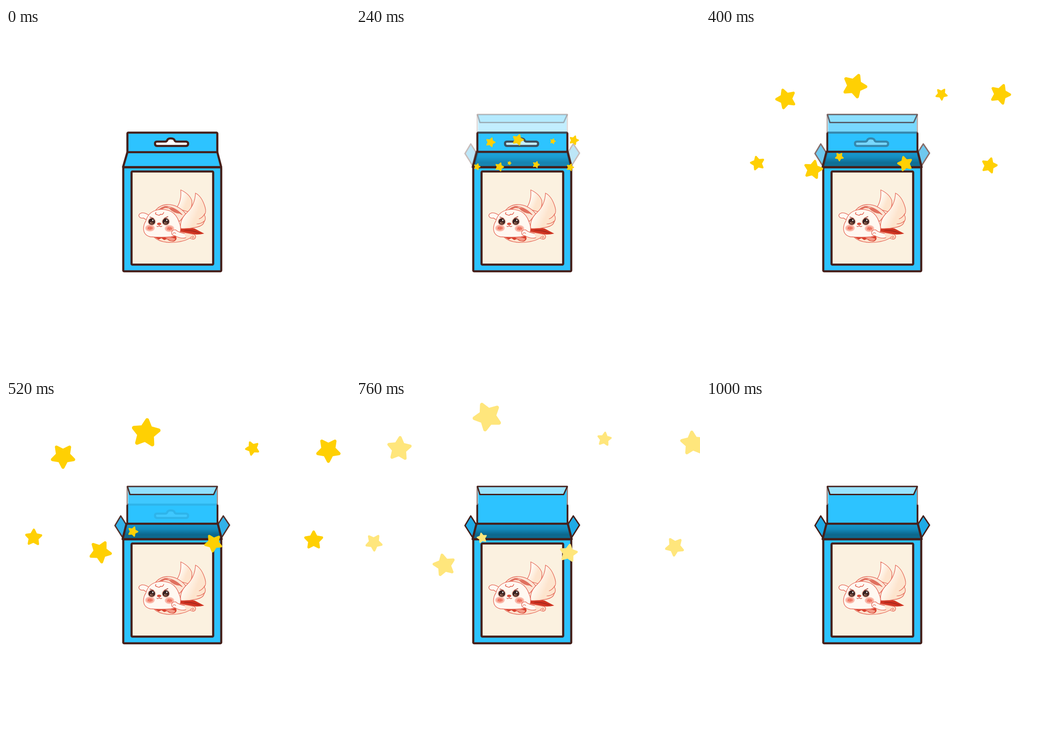
Write an HTML page that moves like this. It is 748 by 748 pixels and loops after 1.12 s.

```html
<!DOCTYPE html>
<html lang="en">
<head>
<meta charset="utf-8">
<title>Star box</title>
<style>
  html, body { margin: 0; width: 100%; height: 100%; overflow: hidden; background: #fff; }
  svg { display: block; width: 100vw; height: 100vh; }
  .box { fill: #2dc3ff; stroke: #451f1a; stroke-width: 4.6; stroke-linejoin: round; }
  .flap { stroke: #451f1a; stroke-width: 3; stroke-linejoin: round; }
  .fur { fill: #fff8f1; stroke: #e66a5a; stroke-width: 1.3; stroke-linejoin: round; stroke-linecap: round; }
  .line { fill: none; stroke: #e2614f; stroke-width: 1.2; stroke-linecap: round; }
</style>
</head>
<body>
<svg viewBox="0 0 748 748">
  <defs>
    <linearGradient id="inside" x1="0" y1="0" x2="0" y2="1">
      <stop offset="0" stop-color="#1699d0"/>
      <stop offset=".35" stop-color="#128abc"/>
      <stop offset=".7" stop-color="#0d688d"/>
      <stop offset="1" stop-color="#0e6b90"/>
    </linearGradient>
    <linearGradient id="plume" x1="0" y1="0" x2="1" y2=".6">
      <stop offset=".4" stop-color="#fff8f0"/>
      <stop offset=".75" stop-color="#fde4cd"/>
    </linearGradient>
    <radialGradient id="blush">
      <stop offset=".3" stop-color="#f4826f"/>
      <stop offset="1" stop-color="#f9ab99" stop-opacity=".6"/>
    </radialGradient>
    <radialGradient id="iris" cy=".75">
      <stop offset="0" stop-color="#8a5643"/>
      <stop offset=".75" stop-color="#35201f"/>
    </radialGradient>
    <g id="eye">
      <ellipse rx="8.8" ry="8.6" fill="#f3b8a6"/>
      <circle r="7.2" fill="url(#iris)"/>
      <circle cx="2.2" cy="-3" r="1.5" fill="#fff"/>
      <circle cx="-2.5" cy="2.5" r=".9" fill="#e8c0ad"/>
    </g>
    <g id="cheek">
      <ellipse rx="10.5" ry="7.4" fill="url(#blush)"/>
      <path d="M-4 2l2-4M0 3l2-5M4 2l1-3" class="line"/>
    </g>
  </defs>

  <rect class="box" x="264" y="227.5" width="195.5" height="43" rx="2"/>
  <path fill="#fff" stroke="#451f1a" stroke-width="4.6" stroke-linejoin="round"
    d="M328 247H346Q350 247 351 243Q353 240 358 240Q364 240 366 243Q367 247 371 247H392Q396 248 396 251.500Q396 256 392 256.500H328Q324 256 324 251.500Q324 247 328 247Z"/>

  <g id="lid">
    <rect x="265.500" y="188" width="192.500" height="82" fill="#2dc3ff"/>
    <path d="M263.500 228V188M459.500 228V188" stroke="#8f7773" stroke-width="2.6"/>
    <path class="flap" fill="#99e3ff" d="M264 188H459.500L451.500 205.500H269.500Z"/>
    <path class="flap" fill="#1faae6" d="M249.500 252L261.500 271L253.500 299L237 273Z"/>
    <path class="flap" fill="#1faae6" d="M472.500 252L486 272L469 299L461 270Z"/>
  </g>

  <path class="box" d="M264 270H459.500L468 302.500H254.500Z"/>
  <path id="slot" class="box" style="fill:url(#inside)" d="M262 269H460.500L469 302.500H253.500Z"/>
  <rect class="box" x="255" y="303" width="213" height="226" rx="2"/>
  <rect class="box" style="fill:#fbf1e0" x="273" y="312" width="177.500" height="202.500" rx="2"/>

  <g id="rabbit">
    <path class="fur" style="fill:url(#plume)" d="M380 352Q399 361 404 375Q406 388 398 400L370 392Q382 377 380 352Z"/>
    <path class="fur" style="fill:#fce5d5" d="M321 403Q331 385 350 384Q373 383 391 404L378 420L325 411Z"/>
    <path class="line" d="M330 396Q352 382 381 405M344 388Q365 387 383 406"/>
    <path fill="#e0705f" d="M353 391Q371 390 380 404Q365 404 353 391ZM335 392Q346 385 356 389Q344 390 338 396Z"/>
    <path class="fur" d="M314 410Q304 401 295 402Q288 404 289 409Q292 415 299 413Q305 419 311 415Z"/>
    <path fill="#cf3321" d="M377 434Q395 432 410 436L431 447Q416 451 398 447L374 446Z"/>
    <path class="line" style="stroke:#8f211a" d="M388 440Q404 439 421 446"/>
    <path class="fur" style="fill:url(#plume)" d="M412 359Q426 366 433 390Q436 402 431 406Q436 414 431 421Q429 430 415 433Q398 437 380 436Q377 417 393 402Q411 385 412 359Z"/>
    <path class="line" d="M432 404Q428 412 420 415M431 420Q424 426 415 426"/>
    <path class="fur" style="fill:#fde2cd" d="M321 454Q331 464 350 466Q380 468 400 457Q409 462 412 456Q414 449 405 448L374 442Z"/>
    <path class="line" d="M401 456Q404 451 406 457M406 452L409 456"/>
    <path fill="#d8402d" d="M320 453L369 452Q374 460 365 464Q356 465 350 459L344 461L338 457L332 460Z"/>
    <path fill="#f29a87" d="M346 456Q358 453 368 458Q367 464 359 463Z"/>
    <path class="fur" d="M299 437Q299 427 304 420Q309 402 324 397Q341 391 359 399Q371 406 376 421Q381 432 379 442Q375 452 359 454Q338 456 314 454Q300 451 299 437Z"/>
    <path class="line" style="stroke-width:1.5" d="M326 401Q323 405 329 406Q333 409 336 405Q341 407 343 401"/>
    <use href="#cheek" x="313" y="435"/>
    <use href="#cheek" x="355.500" y="436"/>
    <use href="#eye" x="317" y="421"/>
    <use href="#eye" x="347.500" y="421"/>
    <path class="line" style="stroke:#a8453a;stroke-width:1.5" d="M313 411L321 414M344 414L352 410"/>
    <ellipse cx="333" cy="426" rx="4.500" ry="2.800" fill="#d94c3b"/>
    <path class="line" style="stroke:#c64234" d="M328 431Q331 433 333 430Q336 433 339 431"/>
    <path class="fur" d="M388 447Q374 444 369 439Q361 438 360 445Q360 451 368 452Q380 459 391 456"/>
    <path class="line" d="M363 447Q366 443 369 447"/>
  </g>

  <g id="stars" stroke-width=".26" stroke-linejoin="round"></g>
</svg>

<script>
const LOOP = 1120, BURST = 160, FADE = 540, GONE = 1000;
const POSE_TIMES = [160, 320, 400, 520, 640, 760, 1000];
const SIZES = [.16, .63, .85, 1, 1, 1, 1];
const TILT = 18;   // shared tilt of all stars as they leave the box
const SPIN = .131; // degrees per ms
const GOLD = [255, 208, 3];

// radius, angle at 520 ms, spin direction, then the path at the main poses
const stars = [
  [27, 36, -1, "346,293 237,203 174,154 124,122 94,106"],
  [32, 6, -1, "363,295 340,189 323,126 304,72 286,36"],
  [16, 48, 1, "386,293 470,198 512,144 536,105 540,85"],
  [27, 36, 1, "397,291 553,196 640,144 701,109 732,94"],
  [19, 2, 1, "335,307 190,297 112,294 60,299 39,310"],
  [25, 28, 1, "349,304 274,301 233,308 205,330 192,359"],
  [11.5, 20, -1, "355,304 312,285 290,280 276,286 274,300"],
  [20, 41, -1, "373,304 411,293 433,295 451,311 462,333"],
  [21, 0, -1, "395,307 538,300 616,299 669,305 693,319"]
].map(makeStar);

const lid = document.getElementById("lid");
const slot = document.getElementById("slot");
const starLayer = document.getElementById("stars");

function makeStar([radius, angle, direction, path]) {
  const points = path.split(" ").map(p => p.split(",").map(Number));
  const [xs, ys] = [0, 1].map(axis => {
    const v = points.map(p => p[axis]);
    const last = v[4] - v[3];
    return [...v.slice(0, 4), v[3] + .62 * last, v[4], v[4] + .25 * last];
  });
  const node = document.createElementNS("http://www.w3.org/2000/svg", "path");
  node.setAttribute("d", starPath());
  document.getElementById("stars").append(node);
  return { node, radius, angle, direction, xs, ys };
}

function starPath() {
  const corners = Array.from({ length: 10 }, (_, i) => {
    const r = i % 2 ? .46 : .89, a = i * Math.PI / 5;
    return `${(r * Math.sin(a)).toFixed(3)} ${(-r * Math.cos(a)).toFixed(3)}`;
  });
  return `M${corners.join("L")}Z`;
}

const clamp = v => Math.max(0, Math.min(1, v));
const mix = (a, b, u) => a + (b - a) * u;

// Smooth curve through the poses without overshoot
function glide(values, t) {
  const T = POSE_TIMES, end = T.length - 2;
  let i = 0;
  while (i < end && t >= T[i + 1]) i++;
  const slope = k => (values[k + 1] - values[k]) / (T[k + 1] - T[k]);
  const tangent = k => {
    if (k === 0) return slope(0);
    if (k > end) return slope(end);
    const a = slope(k - 1), b = slope(k);
    return a * b > 0 ? 2 * a * b / (a + b) : 0;
  };
  const h = T[i + 1] - T[i], u = clamp((t - T[i]) / h), w = 1 - u;
  return values[i] * w * w * (1 + 2 * u) + values[i + 1] * u * u * (3 - 2 * u)
    + h * u * w * (w * tangent(i) - u * tangent(i + 1));
}

// The picture advances in 40 ms ticks, with a few longer holds
function tick(t) {
  const step = Math.floor(t / 40) * 40;
  return [600, 680, 800, 960].includes(step) ? step - 40 : step;
}

function draw(time) {
  const t = tick(time % LOOP);
  const open = t < BURST ? 0 : clamp((t - 110) / 450);
  for (const part of lid.children) part.setAttribute("opacity", open);
  slot.setAttribute("opacity", open && clamp(.5 + open * .65));

  const visible = t >= BURST && t < GONE;
  starLayer.setAttribute("display", visible ? "inline" : "none");
  if (!visible) return;

  // Stars stay solid and pale towards white
  const pale = clamp((t - FADE) / (GONE - FADE));
  const color = `rgb(${GOLD.map(c => Math.round(mix(c, 255, pale)))})`;
  starLayer.setAttribute("fill", color);
  starLayer.setAttribute("stroke", color);

  const size = glide(SIZES, t);
  for (const s of stars) {
    const spin = s.angle + s.direction * SPIN * (t - 520);
    const turn = mix(TILT, spin, clamp((t - 320) / 80));
    s.node.setAttribute("transform",
      `translate(${glide(s.xs, t)} ${glide(s.ys, t)}) rotate(${turn}) scale(${s.radius * size})`);
  }
}

const start = performance.now();
function frame() {
  draw(performance.now() - start);
  requestAnimationFrame(frame);
}
frame();
</script>
</body>
</html>
```
